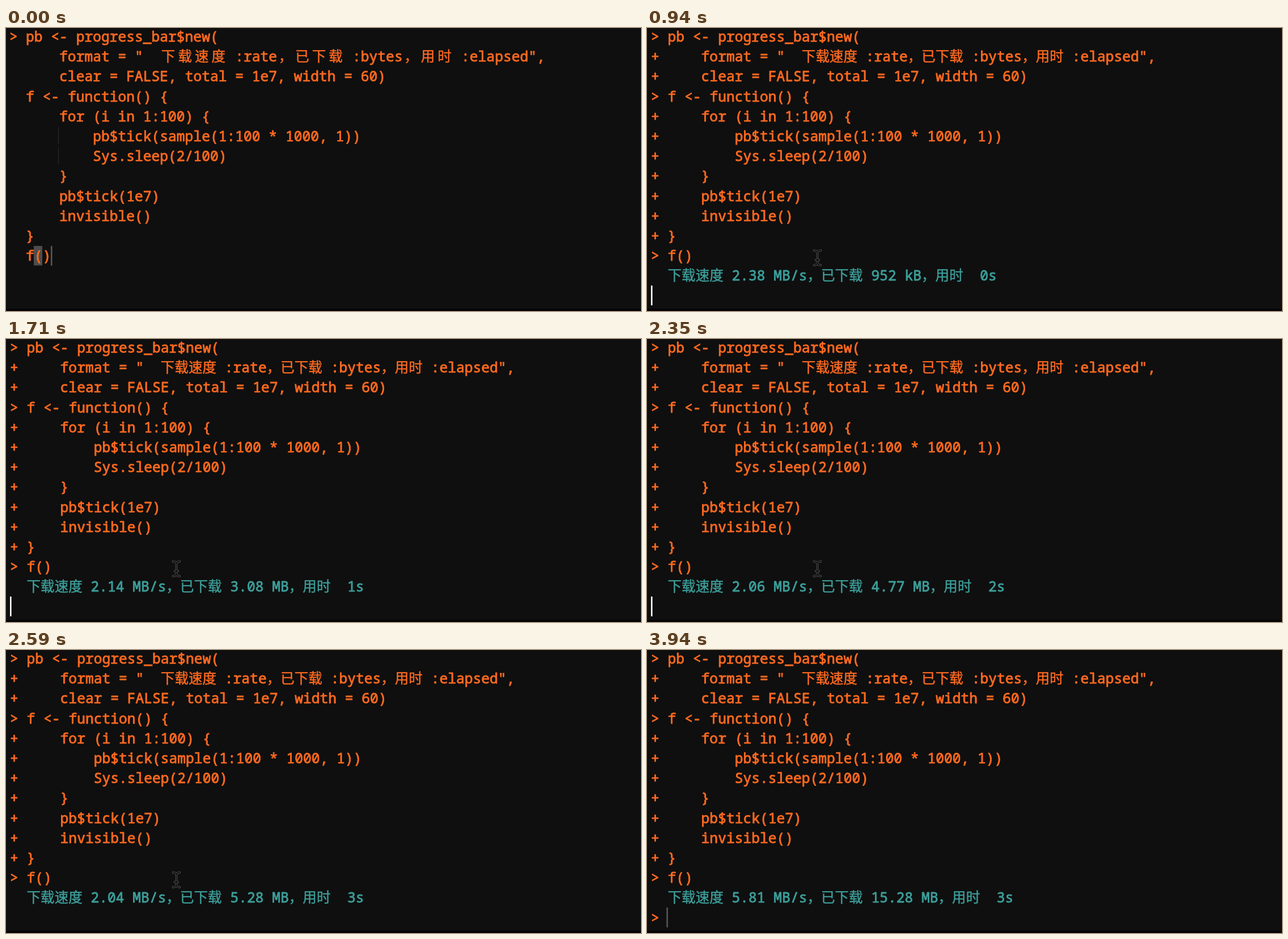
Recreate the animation shown at these times as an HTML page. Size 1120 px wide and 500 px high, loop 5 s.

```html
<!DOCTYPE html>
<html lang="zh-CN">
<head>
<meta charset="utf-8">
<style>
  html, body { margin: 0; width: 100%; height: 100%; overflow: hidden; background: #0f0f0f; }
  svg { display: block; width: 1120px; height: 500px; }
  text {
    font: 24.62px "Noto Sans Mono", "DejaVu Sans Mono", monospace;
    stroke-width: .85; stroke-linejoin: round; white-space: pre;
  }
  text.han { font: 24.5px "Noto Sans CJK SC", "Noto Sans CJK", sans-serif; stroke-width: .45; }
  .code { fill: #ff6a20; stroke: #ff6a20; }
  .status { fill: #3c9e9a; stroke: #3c9e9a; }
</style>
</head>
<body>
<svg viewBox="0 0 1120 500">
  <defs>
    <path id="beam" d="M-6-13Q0-13 0-8Q0-13 6-13M0-8V8M-6 13Q0 13 0 8Q0 13 6 13M-3 4H3"/>
  </defs>
  <rect width="1120" height="500" fill="#0f0f0f"/>
  <g id="edit" class="code">
    <rect x="49" y="385" width="15" height="34.5" fill="#4d4d4d" stroke="none"/>
    <path d="M92.5 176V206M92.5 211V241" stroke="#4a4a4a" stroke-dasharray="1.5 1.5" fill="none"/>
  </g>
  <g id="run">
    <g id="log" class="code"></g>
    <g id="status" class="status"></g>
    <g id="prompt" class="code"></g>
  </g>
  <rect id="strip" x="1115" width="5" height="456" fill="#000"/>
  <rect y="496" width="1120" height="4" fill="#050505"/>
  <rect id="caret" width="2.6" height="35"/>
  <g id="mouse" fill="none" stroke-linecap="round">
    <use href="#beam" stroke="#686868" stroke-width="3.4"/>
    <use href="#beam" stroke="#0b0b0b" stroke-width="1.8"/>
  </g>
</svg>
<script>
const LOOP = 5000, STEPS = 85, CELL = 14.77, HAN = 24.55, ROW = 35.2;
const $ = id => document.getElementById(id);

const lines = [
  'pb <- progress_bar$new(',
  '    format = "  下载速度 :rate，已下载 :bytes，用时 :elapsed",',
  '    clear = FALSE, total = 1e7, width = 60)',
  'f <- function() {',
  '    for (i in 1:100) {',
  '        pb$tick(sample(1:100 * 1000, 1))',
  '        Sys.sleep(2/100)',
  '    }',
  '    pb$tick(1e7)',
  '    invisible()',
  '}',
  'f()'
];

function put(parent, x, y, str, han) {
  const el = document.createElementNS('http://www.w3.org/2000/svg', 'text');
  el.setAttribute('x', x);
  el.setAttribute('y', y);
  if (han) el.setAttribute('class', 'han');
  el.textContent = str;
  parent.appendChild(el);
}

// Lays out one row; each Chinese character takes hanWidth and is centred in it.
function write(parent, x, row, str, hanWidth = HAN) {
  const y = 24 + row * ROW;
  for (const part of str.match(/ +|[\x21-\x7e]+|[^\x00-\x7f]/g)) {
    const han = part.charCodeAt(0) > 127;
    if (part[0] !== ' ') put(parent, han ? x + (hanWidth - HAN) / 2 : x, y, part, han);
    x += han ? hanWidth : part.length * CELL;
  }
}

write($('edit'), 6, 0, '>');
lines.forEach((line, i) => {
  write($('edit'), 5.5 + 2 * CELL, i, line, 2 * CELL);
  write($('log'), 7, i, (/^(pb|f)/.test(line) ? '> ' : '+ ') + line);
});
write($('prompt'), 7, 13, '>');

// time, megabytes, elapsed seconds
const progress = [
  [650, 0, 0], [940, .952, .4], [1470, 2.56, 1.123], [1710, 3.08, 1.439],
  [2350, 4.77, 2.316], [2590, 5.28, 2.588], [2650, 15.28, 2.63]
];
// time, x, y of the pointer
const track = [
  [60, 313, 427], [470, 300.5, 406], [2820, 300.5, 406],
  [3060, 328, 410], [3230, 328, 410], [3290, 337, 411]
];

function sample(keys, t) {
  const last = keys[keys.length - 1];
  if (t >= last[0]) return last.slice(1);
  const i = Math.max(1, keys.findIndex(k => k[0] > t));
  const a = keys[i - 1], b = keys[i];
  const u = Math.max(0, (t - a[0]) / (b[0] - a[0]));
  return [a[1] + (b[1] - a[1]) * u, a[2] + (b[2] - a[2]) * u];
}

const bytes = mb => mb < .9995 ? Math.round(mb * 1000) + ' kB' : mb.toFixed(2) + ' MB';
const between = (t, a, b) => t >= a && t < b;
const show = (id, on) => $(id).setAttribute('visibility', on ? 'visible' : 'hidden');

const stepTime = k => Math.round(k * LOOP / STEPS / 10) * 10;
function snap(t) {
  const k = Math.round(t * STEPS / LOOP);
  return stepTime(stepTime(k) > t ? k - 1 : k);
}

function caretAt(t) {
  const white = '#fff', grey = '#565656';
  if (t < 650) return [79, 385, t < 60 ? grey : t < 290 ? white : null];
  if (t < 2650) {
    const off = between(t, 1000, 1350) || between(t, 1760, 2060) || t >= 2470;
    return [7, 455, off ? null : white];
  }
  const on = between(t, 2880, 3290) || t >= 3760;
  return [34.3, 455, on ? (t >= 3940 ? grey : white) : null];
}

let shown = '';
function render(time) {
  const t = snap(time);
  const running = t >= 650;
  show('edit', !running);
  show('log', running);
  show('prompt', t >= 2650);

  const nudged = between(t, 1470, 1530) || between(t, 2470, 2530);
  $('run').setAttribute('transform', `translate(${nudged ? -5.5 : 0} 0)`);
  show('strip', nudged);

  let str = '';
  if (t >= 710) {
    const [mb, sec] = sample(progress, t);
    str = `  下载速度 ${bytes(mb / sec)}/s，已下载 ${bytes(mb)}，用时  ${Math.round(sec)}s`;
  }
  if (str !== shown) {
    $('status').replaceChildren();
    if (str) write($('status'), 7, 12, str);
    shown = str;
  }

  const [cx, cy, color] = caretAt(t);
  show('caret', color);
  $('caret').setAttribute('x', cx);
  $('caret').setAttribute('y', cy);
  $('caret').setAttribute('fill', color || 'none');

  const [mx, my] = sample(track, t);
  show('mouse', between(t, 60, 3350));
  $('mouse').setAttribute('transform', `translate(${mx} ${my})`);
}

const start = performance.now();
function tick() {
  render((performance.now() - start) % LOOP);
  requestAnimationFrame(tick);
}
tick();
</script>
</body>
</html>
```
